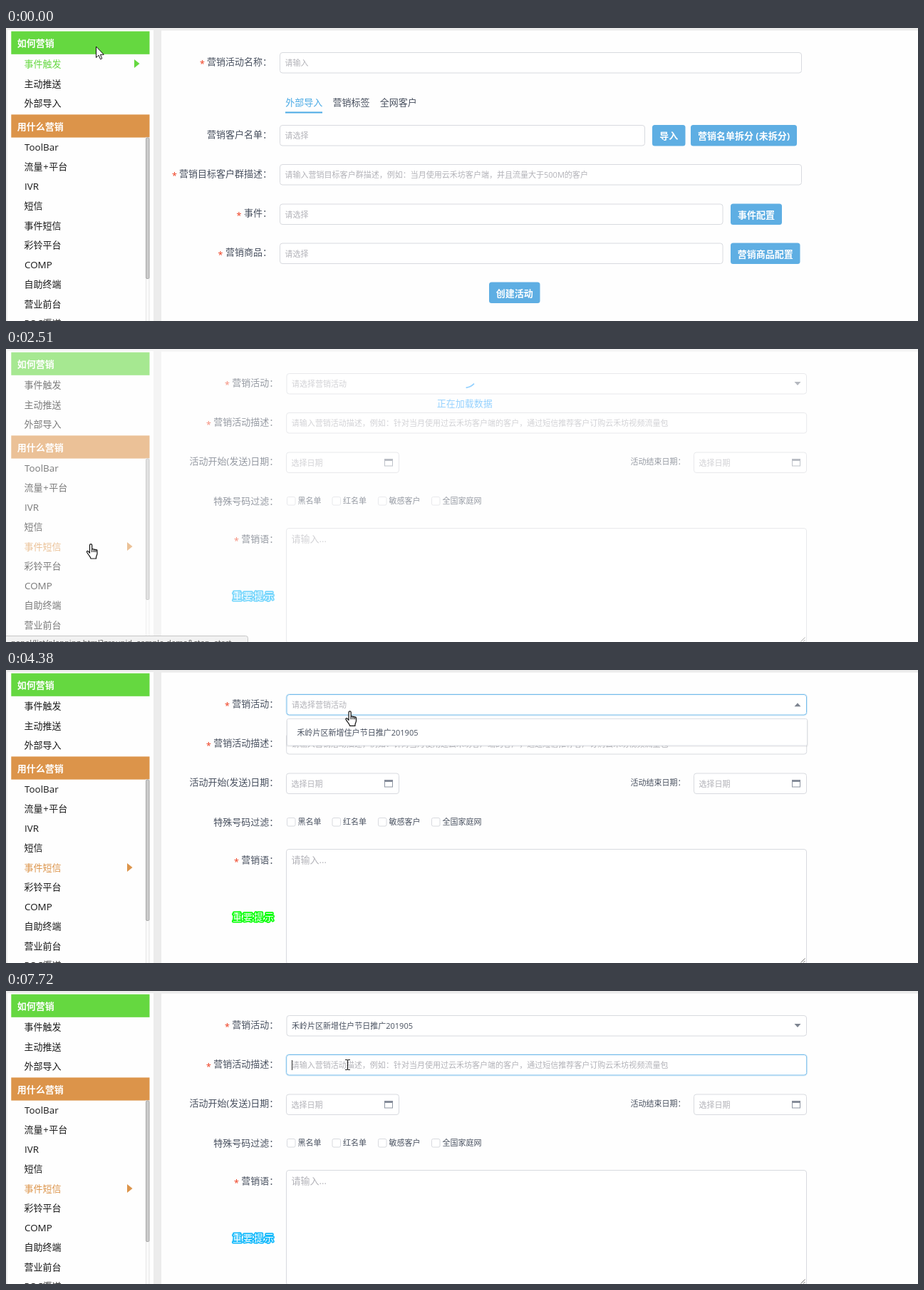
Recreate the animation shown at these times as an HTML page. Size 1280 by 411 pixels, loop 8000 ms.

```html
<!DOCTYPE html>
<html lang="zh-CN">
<head>
<meta charset="utf-8">
<title>营销活动配置</title>
<style>
  html, body { margin: 0; width: 100%; height: 100%; overflow: hidden; background: #ececec; }
  svg { display: block; width: 100vw; height: 100vh; }
  text { font-family: "Open Sans", "Noto Sans CJK SC", "Noto Sans CJK", sans-serif; white-space: pre; }
</style>
</head>
<body>
<svg id="stage" viewBox="0 0 1280 411" preserveAspectRatio="none"></svg>
<script>
const LOOP = 8000;
const SPIN_START = 2340;
const C = {
  ink: '#181818', label: '#48505f', hint: '#b2b2b8', line: '#d8dadf', blue: '#5eaee3',
  green: '#65d840', orange: '#dc944a', star: '#ee3a1c', tipBlue: '#12b9fb', tipGreen: '#00ff00'
};
const CAMPAIGN = '禾岭片区新增住户节日推广201905';

// Each step changes part of the state and holds until the next one.
const arrow = (x, y) => ({ cur: ['arrow', x, y] });
const hand = (x, y) => ({ cur: ['hand', x, y] });
const beam = (x, y) => ({ cur: ['beam', x, y] });
const steps = [
  [0, { ...arrow(126.5, 26), page: 1, hover: -1, status: 0, mask: 0, focus: 0, menu: 0, tip: C.tipBlue }],
  [280, arrow(84, 32)],
  [410, arrow(20.5, 36)],
  [550, { cur: null }],
  [820, { ...hand(24, 252), hover: 3 }],
  [960, hand(62, 251)],
  [1100, hand(92, 250)],
  [1240, hand(102.5, 249)],
  [1390, { status: 0.5 }],
  [1540, { status: 1 }],
  [1820, hand(108, 261)],
  [1940, { ...hand(112.5, 273), hover: 4 }],
  [2220, { page: 2, hover: -1 }],
  [2370, { mask: 0.12 }],
  [2510, { mask: 0.47 }],
  [2630, { mask: 0.9 }],
  [2770, { mask: 1 }],
  [2910, { mask: 0.5, status: 0.5 }],
  [3050, { mask: 0, status: 0, tip: C.tipGreen }],
  [3330, { ...arrow(250, 222), tip: C.tipBlue }],
  [3480, arrow(349, 175)],
  [3600, arrow(418, 126)],
  [3730, { ...arrow(462, 82), tip: C.tipGreen }],
  [3860, hand(474, 62)],
  [4000, { ...hand(476, 57.3), tip: C.tipBlue }],
  [4130, { focus: 1 }],
  [4260, { menu: 0.5, open: true }],
  [4380, { menu: 1, tip: C.tipGreen }],
  [4690, { ...hand(476, 66), tip: C.tipBlue }],
  [4830, { ...hand(476, 77), pick: true }],
  [4970, hand(476, 84)],
  [5100, { tip: C.tipGreen }],
  [5240, { value: true, open: false, menu: 0.8 }],
  [5380, { menu: 0.35, tip: C.tipBlue }],
  [5630, { menu: 0, focus: 0, tip: C.tipGreen }],
  [5910, { tip: C.tipBlue }],
  [6030, beam(479.5, 97)],
  [6180, { ...beam(479.5, 103.5), tip: C.tipGreen }],
  [6450, { focus: 2, tip: C.tipBlue }],
  [6590, { caret: true }],
  [6730, { tip: C.tipGreen }],
  [7010, { caret: false, tip: C.tipBlue }],
  [7440, { caret: true, tip: C.tipGreen }],
  [7720, { tip: C.tipBlue }]
];

const rect = (x, y, w, h, fill, extra = '') =>
  `<rect x="${x}" y="${y}" width="${w}" height="${h}" fill="${fill}" ${extra}/>`;
const path = (d, fill, extra = '') => `<path d="${d}" fill="${fill}" ${extra}/>`;
// Text placed by its left edge and the middle of its line.
const text = (x, mid, str, size, fill, extra = '') =>
  `<text x="${x}" y="${mid + size * 0.37}" font-size="${size}" fill="${fill}" ${extra}>${str}</text>`;
const bold = 'font-weight="700"';

const box = (x, y, w, h, focused) =>
  (focused ? rect(x - 0.5, y - 0.5, w + 2, h + 2, 'none', 'rx="4.5" stroke="#dcedf9"') : '') +
  rect(x + 0.5, y + 0.5, w, h, '#fff', `rx="3.5" stroke="${focused ? '#74bceb' : C.line}"`);
const field = (x, y, w, hint, focused, fill = C.hint) =>
  box(x, y, w, 28.5, focused) + text(x + 7.5, y + 15, hint, 11.03, fill);
const button = (x, y, w, str) =>
  rect(x, y, w, 29.5, C.blue, 'rx="3.5"') +
  text(x + w / 2, y + 15.5, str, 13, '#fff', bold + ' text-anchor="middle"');
// Right-aligned label; starX places the required mark.
const label = (right, mid, str, starX) =>
  text(right, mid, str + '：', 13, C.label, 'text-anchor="end"') +
  (starX ? `<text x="${starX}" y="${mid + 8.3}" font-size="12.5" fill="${C.star}">*</text>` : '');
const marker = (x, mid, fill) => path(`M${x} ${mid - 6}l7.5 6l-7.5 6z`, fill);
const heading = (y, str, fill) =>
  rect(7.3, y, 194.2, 32.2, fill) + text(15.7, y + 16.4, str, 13, '#fff', bold);

function sidebar(s) {
  const how = ['事件触发', '主动推送', '外部导入'];
  const tools = ['ToolBar', '流量<tspan dx=".7">+</tspan><tspan dx=".7">平台</tspan>', 'IVR', '短信',
    '事件短信', '彩铃平台', 'COMP', '自助终端', '营业前台', 'POC渠道'];
  const item = (str, mid, fill) => {
    const latin = /^[A-Za-z]+$/.test(str);
    return text(latin ? 26 : 25.5, mid - 0.3, str, latin ? 13.4 : 13, fill);
  };
  let out = rect(2, 3, 205, 408, '#fefefe');
  out += heading(4.6, '如何营销', C.green);
  how.forEach((str, i) => {
    const on = s.page === 1 && i === 0;
    out += item(str, 50.5 + 27.55 * i, on ? C.green : C.ink);
    if (on) out += marker(180, 50, C.green);
  });
  out += heading(121.4, '用什么营销', C.orange);
  tools.forEach((str, i) => {
    const mid = 167 + 27.55 * i;
    const on = s.page === 2 && i === 4;
    if (s.hover === i) out += rect(7, mid - 13.7, 189, 27.6, '#dedede');
    out += item(str, mid, on ? C.orange : C.ink);
    if (on) out += marker(170, 277, C.orange);
  });
  out += rect(196, 153.5, 5.5, 258, '#fafafa') + rect(196, 153.5, 1, 258, '#e6e6e6') + rect(200.5, 153.5, 1, 258, '#e6e6e6');
  return out + rect(196.5, 154, 4.5, 197.5, '#cbcbcb', 'rx="1.5" stroke="#a9a9a9"');
}

function triggerPage() {
  const R = 373;
  return label(R, 47, '营销活动名称', 272) + field(384, 34, 732, '请输入') +
    text(392.3, 104, '外部导入', 13, '#4aaae5') + rect(392, 117.5, 52, 2, '#4aaae5') +
    text(458.5, 104, '营销标签', 13, C.label) + text(524.7, 104, '全网客户', 13, C.label) +
    label(R, 149, '营销客户名单') + field(384, 136, 512, '请选择') +
    button(907, 136, 46.5, '导入') + button(961, 136, 149, '营销名单拆分 (未拆分)') +
    label(R, 204, '营销目标客户群描述', 233) +
    field(384, 191, 732, '请输入营销目标客户群描述，例如：当月使用云禾坊客户端，并且流量大于500M的客户') +
    label(R, 259.5, '事件', 323.5) + field(384, 246.5, 621.5, '请选择') + button(1017, 246.5, 72, '事件配置') +
    label(R, 314.5, '营销商品', 297.5) + field(384, 301.5, 621.5, '请选择') + button(1017, 301.5, 97.5, '营销商品配置') +
    button(678, 356.5, 71.5, '创建活动');
}

function smsPage(s) {
  const R = 382.3;
  const calendar = x => rect(x + 0.5, 154.5, 11, 9.5, 'none', 'stroke="#9097a3"') + rect(x, 154, 12, 3, '#858c99');
  const check = (x, str) => rect(x + 0.5, 207.5, 11.5, 11.5, '#fff', `rx="2" stroke="${C.line}"`) +
    text(x + 15.5, 213, str, 11.03, C.label);
  let out = label(R, 47, '营销活动', 307) +
    field(393.5, 34, 729.5, s.value ? CAMPAIGN : '请选择营销活动', s.focus === 1, s.value ? C.label : C.hint) +
    path(s.open ? 'M1106.5 51.3h9l-4.5-5z' : 'M1106.5 46h9l-4.5 5z', '#7d8490');
  out += label(R, 102.3, '营销活动描述', 281) +
    field(393.2, 89, 730, '请输入营销活动描述，例如：针对当月使用过云禾坊客户端的客户，通过短信推荐客户订购云禾坊视频流量包', s.focus === 2);
  if (s.caret) out += rect(401, 97, 1, 14, '#333');
  out += label(R, 157.5, '活动开始(发送)日期') + field(393, 144.5, 158, '选择日期') + calendar(531) +
    text(876.5, 158, '活动结束日期：', 11.03, C.label) + field(965, 144.5, 158, '选择日期') + calendar(1103);
  out += label(R, 212.8, '特殊号码过滤') + check(394, '黑名单') + check(457.5, '红名单') +
    check(522, '敏感客户') + check(597, '全国家庭网');
  out += label(R, 266, '营销语', 320) + box(393, 251, 730, 161) + text(400.5, 266, '请输入...', 13, C.hint) +
    path('M1115.5 410.5l6-6M1119 410.5l2.5-2.5', 'none', 'stroke="#777"');
  // Outline first, then the letters, so neighbours stay uncovered.
  const tip = (fill, extra = '') => text(318, 346, '重要提示', 13, fill, 'letter-spacing="2" ' + extra);
  out += tip(s.tip, `stroke="${s.tip}" stroke-width="3.4" stroke-linejoin="round"`) + tip('#fff', 'font-weight="500"');
  if (s.menu) {
    out += `<g opacity="${s.menu}">` +
      rect(393, 69, 733, 39, '#000', 'rx="3" opacity=".05"') +
      rect(394.5, 68.5, 730, 37.5, '#fff', 'rx="2" stroke="#dcdfe5"') +
      (s.pick ? rect(395, 74, 729, 27, '#e4e8f1') : '') +
      text(408.5, 88, CAMPAIGN, 11.03, C.label) + '</g>';
  }
  return out;
}

function loading(s, at) {
  if (!s.mask) return '';
  const age = Math.max(0, at - SPIN_START);
  const p = Math.min(1, age / 750);
  const grow = p * p * (3 - 2 * p);
  const turn = age / 2000 * 360 + grow * 114;
  const arc = 0.5 + grow * 83;
  return `<g opacity="${s.mask}">` + rect(0, 0, 1280, 411, '#fff', 'opacity=".9"') +
    `<circle cx="643.5" cy="36" r="18.4" fill="none" stroke="#20a0ff" stroke-width="1.9" stroke-linecap="round"
      stroke-dasharray="${arc} 200" transform="rotate(${turn} 643.5 36)"/>` +
    text(643.7, 76.3, '正在加载数据', 13, '#20a0ff', 'text-anchor="middle"') + '</g>';
}

function statusBar(s) {
  if (!s.status) return '';
  return `<g opacity="${s.status}">` +
    rect(-2, 402.5, 341.5, 20, '#f2f2f2', 'rx="3" stroke="#c6c6c6"') +
    text(7, 411.5, 'panel/list/planning.html?groupid=sample-demo&amp;step=start', 11.2, '#555') + '</g>';
}

const shapes = {
  arrow: path('M0 0V15.5L3.6 12.2 6 17.8 8.3 16.8 5.9 11.3H10.8Z', '#fff', 'stroke="#111" stroke-linejoin="round"'),
  hand: path('M5 13V2.2a1.6 1.6 0 0 1 3.2 0V8.5c.2-1.5 2.6-1.3 2.8.3c.3-1.2 2.3-1 2.5.5c.3-1 1.9-.8 2 .6V14c0 2-1.2 3-1.5 5V21H6.5c0-2-2-3.5-3.2-5.5L1 12c-.6-1.3 1-2.2 2-1.2z' +
    'M8.2 8.5V12M11 8.8V12M13.5 9.3V12', '#fff', 'stroke="#111" stroke-width="1.2" stroke-linejoin="round"'),
  beam: path('M-3.5-7H-1L0-6.3L1-7H3.5M0-6.3V6.3M-3.5 7H-1L0 6.3L1 7H3.5', 'none', 'stroke="#222" stroke-width="1.2"')
};
const cursor = c => c ? `<g transform="translate(${c[1]} ${c[2]})">${shapes[c[0]]}</g>` : '';

const stage = document.getElementById('stage');
const states = [];
steps.reduce((s, [, change]) => (states.push({ ...s, ...change }), states[states.length - 1]), {});

function draw(i) {
  const s = states[i];
  stage.innerHTML = rect(0, 0, 1280, 411, '#ececec') + rect(218, 3.5, 1062, 408, '#fefefe') +
    sidebar(s) + (s.page === 1 ? triggerPage() : smsPage(s)) +
    loading(s, steps[i][0]) + statusBar(s) + cursor(s.cur);
}

const start = performance.now();
let shown = -1;
function tick() {
  const t = (performance.now() - start) % LOOP;
  let i = steps.length - 1;
  while (steps[i][0] > t) i--;
  if (i !== shown) draw(shown = i);
  requestAnimationFrame(tick);
}
tick();
</script>
</body>
</html>
```
